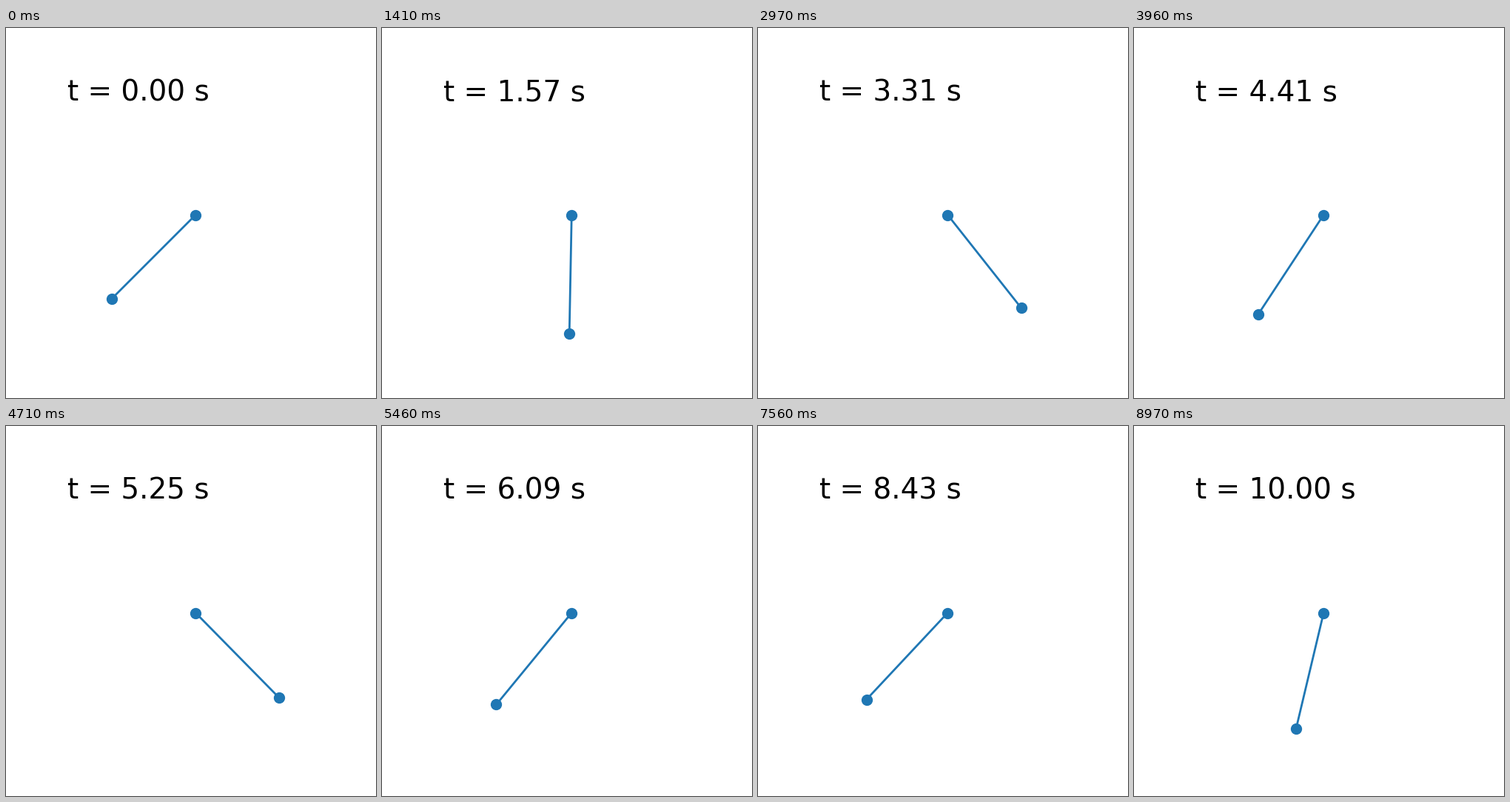
These frames come from a looping animation (500 px wide and 500 px high, 9000 ms). A matplotlib script:

```python
import numpy as np
import matplotlib.pyplot as plt
from matplotlib.animation import FuncAnimation

G, LENGTH = 9.81, 1.0
N, T_END = 300, 10.0
RTOL, ATOL = 1e-3, 1e-6

# Dormand-Prince 5(4) tableau
A = [
    [],
    [1/5],
    [3/40, 9/40],
    [44/45, -56/15, 32/9],
    [19372/6561, -25360/2187, 64448/6561, -212/729],
    [9017/3168, -355/33, 46732/5247, 49/176, -5103/18656],
    [35/384, 0, 500/1113, 125/192, -2187/6784, 11/84],
]
E = np.array([-71/57600, 0, 71/16695, -71/1920, 17253/339200, -22/525, 1/40])
# Dense output polynomial
P = np.array([
    [1, -8048581381/2820520608, 8663915743/2820520608, -12715105075/11282082432],
    [0, 0, 0, 0],
    [0, 131558114200/32700410799, -68118460800/10900136933, 87487479700/32700410799],
    [0, -1754552775/470086768, 14199869525/1410260304, -10690763975/1880347072],
    [0, 127303824393/49829197408, -318862633887/49829197408, 701980252875/199316789632],
    [0, -282668133/205662961, 2019193451/616988883, -1453857185/822651844],
    [0, 40617522/29380423, -110615467/29380423, 69997945/29380423],
])


def deriv(y):
    return np.array([y[1], -G / LENGTH * np.sin(y[0])])


def rms(v):
    return np.sqrt(np.mean(v**2))


def first_step(y):
    scale = ATOL + np.abs(y) * RTOL
    f = deriv(y)
    d0, d1 = rms(y / scale), rms(f / scale)
    h0 = 0.01 * d0 / d1
    d2 = rms((deriv(y + h0 * f) - f) / scale) / h0
    return min(100 * h0, (0.01 / max(d1, d2)) ** 0.2)


def integrate(y, times):
    """Adaptive Runge-Kutta, sampled at the given times."""
    out = np.empty((len(times), 2))
    t, end, h = 0.0, times[-1], first_step(y)
    while t < end:
        rejected = False
        while True:
            t_new = min(t + h, end)
            h = t_new - t
            k = [deriv(y)]
            for row in A[1:]:
                y_new = y + h * np.dot(row, k)
                k.append(deriv(y_new))
            k = np.array(k)
            scale = ATOL + np.maximum(np.abs(y), np.abs(y_new)) * RTOL
            err = rms(h * (E @ k) / scale)
            factor = 0.9 * max(err, 1e-12) ** -0.2
            if err < 1:
                break
            h *= max(0.2, factor)
            rejected = True
        inside = (times >= t) & (times <= t_new)
        s = (times[inside] - t) / h
        powers = np.array([s, s**2, s**3, s**4])
        out[inside] = y + h * (k.T @ P @ powers).T
        t, y = t_new, y_new
        h *= min(1 if rejected else 10, factor)
    return out


times = np.linspace(0, T_END, N)
theta = integrate(np.array([-np.pi / 4, 0.0]), times)[:, 0]

fig, ax = plt.subplots(figsize=(5, 5), dpi=100)
ax.set(xlim=(-1.2, 1.2), ylim=(-1.2, 1.2), aspect="equal")
ax.axis("off")
rod, = ax.plot([], [], "o-", color="C0", lw=2, markersize=10)
label = ax.text(0.05, 0.9, "", transform=ax.transAxes, fontsize=28)


def update(i):
    x, y = LENGTH * np.sin(theta[i]), -LENGTH * np.cos(theta[i])
    rod.set_data([0, x], [0, y])
    label.set_text(f"t = {times[i]:.2f} s")
    return rod, label


anim = FuncAnimation(fig, update, frames=N, interval=30, repeat=True)
plt.show()
```
